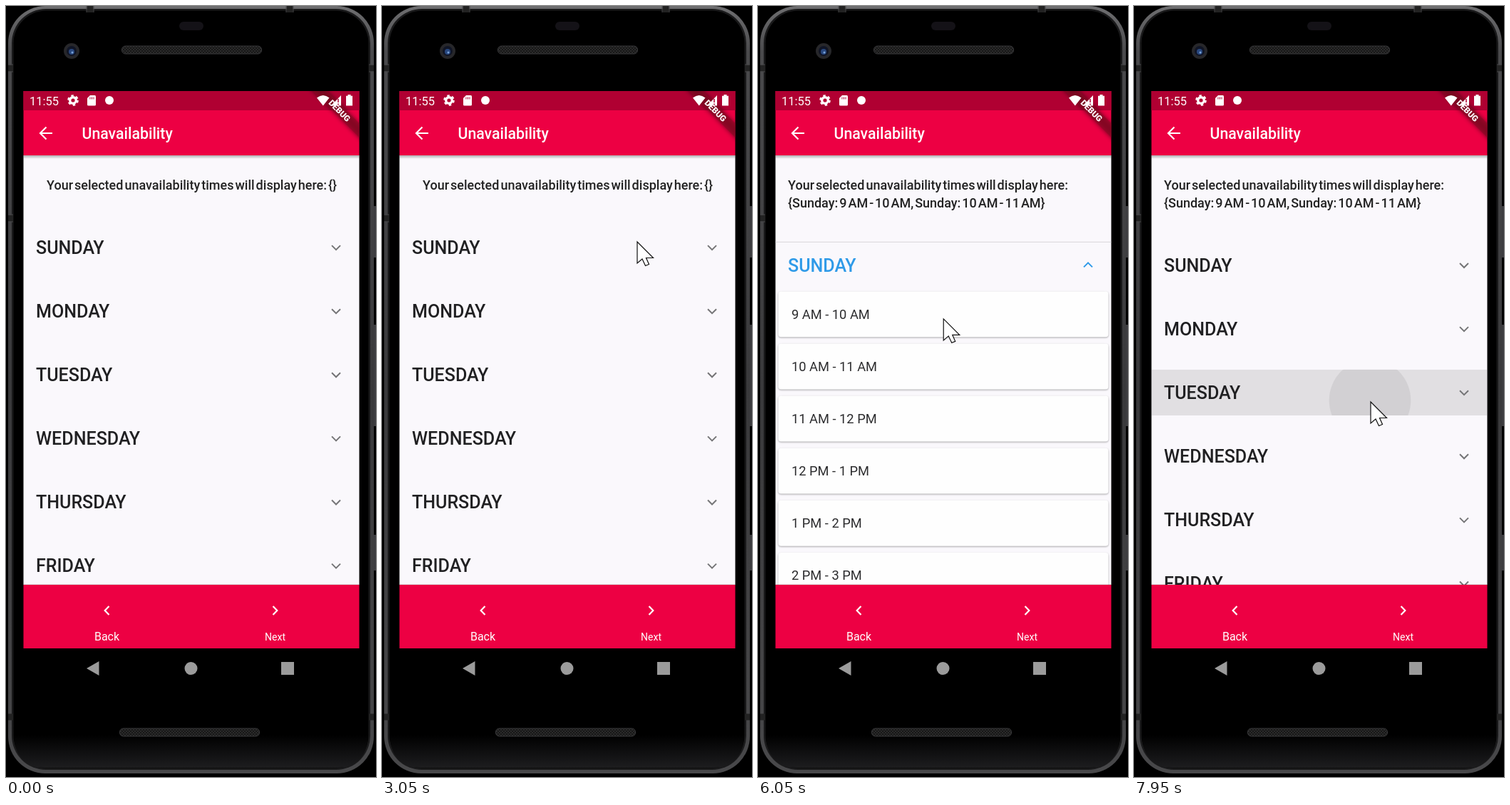
Write an HTML page that moves like this. It is 519 by 1079 pixels and loops after 8000 ms.

```html
<!DOCTYPE html>
<html lang="en">
<head>
<meta charset="utf-8">
<title>Unavailability picker</title>
<style>
  html, body { margin: 0; width: 100%; height: 100%; overflow: hidden; background: #000; }
  svg { display: block; }
  #stage { width: 519px; height: 1079px; font-family: Roboto, "Noto Sans", sans-serif; }
  text { white-space: pre; }
  .title { font-size: 21.3px; font-weight: 500; fill: #fff; }
  .note { font-size: 18px; font-weight: 500; word-spacing: -2.5px; fill: #222; }
  .day { font-size: 25.1px; font-weight: 500; }
  .slot { font-size: 18.3px; fill: #2b2b2d; }
  .card { fill: #fefefe; filter: drop-shadow(0 1px 1px #0005); }
  .line { fill: none; stroke: #fff; stroke-width: 2.2; }
</style>
</head>
<body>
<svg id="stage" viewBox="0 0 519 1079">
  <defs>
    <linearGradient id="rim" x2="0" y2="1">
      <stop stop-color="#6e6e70"/><stop offset=".06" stop-color="#4a4a4c"/>
      <stop offset=".5" stop-color="#39393b"/><stop offset="1" stop-color="#48484a"/>
    </linearGradient>
    <linearGradient id="chin" x2="0" y2="1">
      <stop stop-color="#000"/><stop offset="1" stop-color="#1d1d1f"/>
    </linearGradient>
    <linearGradient id="shade" x2="0" y2="1">
      <stop stop-color="#000" stop-opacity=".3"/><stop offset="1" stop-color="#000" stop-opacity="0"/>
    </linearGradient>
    <pattern id="mesh" width="4" height="4" patternUnits="userSpaceOnUse">
      <rect width="4" height="4" fill="#2b2b2b"/>
      <path d="M0 0h2v2h-2zM2 2h2v2h-2z" fill="#171717"/>
    </pattern>
  </defs>

  <!-- phone body -->
  <path d="M515 280h4v72h-4zM515 446h4v142h-4zM515 740h4v50h-4z" fill="#3d3d40"/>
  <rect x="3" width="513" height="1074" rx="52" fill="url(#rim)"/>
  <rect x="8" y="4" width="503" height="1065" rx="48" fill="#1a1a1b"/>
  <rect x="10.500" y="6.500" width="498" height="1060" rx="46"/>
  <path d="M11 1020H508Q506 1066 464 1066H55Q13 1066 11 1020Z" fill="url(#chin)"/>
  <path d="M118 0v9M398 0v9M3 87h7M3 297h7M509 87h7M509 995h7M3 995h7" stroke="#222" stroke-width="9"/>
  <path d="M113 0v9M123 0v9M393 0v9M403 0v9M3 82h7M3 92h7M3 292h7M3 302h7M509 82h7M509 92h7" stroke="#48484a"/>
  <rect x="243" y="22" width="34" height="12" rx="6" fill="#141217"/>
  <circle cx="92" cy="63" r="11" fill="#27272a"/>
  <circle cx="92" cy="63" r="7" fill="#101526"/>
  <circle cx="92" cy="64" r="4" fill="#28477e"/>
  <circle cx="93" cy="65" r="1.500" fill="#7ba4dc"/>
  <g fill="url(#mesh)" stroke="#39393b">
    <rect x="162.500" y="56" width="196" height="11" rx="5"/>
    <rect x="159.500" y="1011" width="196" height="11" rx="5"/>
  </g>
  <g fill="#9b9b9b">
    <path d="M113 927L130.500 917V937Z"/>
    <circle cx="259.500" cy="927" r="9"/>
    <rect x="386" y="918" width="18" height="18"/>
  </g>

  <!-- scrolling content -->
  <rect x="24.500" y="209" width="471" height="601" fill="#faf8fc"/>
  <svg id="list" x="24.500" y="209" width="471" height="601" viewBox="24.500 209 471 601"></svg>

  <!-- bars -->
  <rect x="24.500" y="209" width="471" height="5" fill="url(#shade)"/>
  <rect x="24.500" y="119" width="471" height="90" fill="#ed0043"/>
  <rect x="24.500" y="119" width="471" height="27" fill="#b00032"/>
  <rect x="24.500" y="810" width="471" height="89" fill="#ed0043"/>
  <path d="M24.500 809.500h471" stroke="#0002"/>
  <svg x="24.500" y="119" width="471" height="100" viewBox="-471 0 471 100">
    <g transform="rotate(45)">
      <rect x="-60" y="32" width="120" height="14" fill="#000" fill-opacity=".5" style="filter:blur(3px)"/>
      <rect x="-60" y="32" width="120" height="14" fill="#8c0a24" fill-opacity=".63"/>
      <text y="43.200" font-size="11.700" font-weight="900" fill="#fff" text-anchor="middle">DEBUG</text>
    </g>
  </svg>
  <g fill="#fff">
    <text x="33" y="138.700" font-size="16.500">11:55</text>
    <circle cx="94" cy="132" r="4.300" fill="none" stroke="#fff" stroke-width="3.400"/>
    <circle cx="94" cy="132" r="6.500" fill="none" stroke="#fff" stroke-width="2.600" stroke-dasharray="3.400"/>
    <path d="M118 125h6.500q1.500 0 1.500 1.500v11.500q0 1.500-1.500 1.500h-9q-1.500 0-1.500-1.500v-9Z"/>
    <path d="M118 127.500v3M120.500 127.500v3M123 127.500v3" stroke="#b00032"/>
    <circle cx="145" cy="132" r="6"/>
    <path d="M436 128.500Q444.800 121.500 453.500 128.500L444.800 139.500Z"/>
    <path d="M456 139.500L470 125V139.500Z"/>
    <path d="M466 130v5M466 136.500v2" stroke="#b00032" stroke-width="1.500"/>
    <path d="M479.500 124h4v1.800h2.500v13.700h-9v-13.700h2.500Z"/>
    <text x="141.500" y="888" font-size="16" text-anchor="middle">Back</text>
    <text x="377.500" y="888" font-size="14" text-anchor="middle">Next</text>
  </g>
  <path class="line" d="M65 178H48.500M56.500 169.500L48 178L56.500 186.500"/>
  <path class="line" d="M144.500 840L138.700 846L144.500 852M374.500 840L380.300 846L374.500 852"/>
  <text class="title" x="106.500" y="185.500">Unavailability</text>
  <path id="cursor" d="M0 0V30L7 24L11.500 33.500L16.500 31.500L12.500 22.500H22.500Z" fill="#fff" stroke="#111" stroke-width="1.200"/>
</svg>
<script>
const LOOP = 8000, LEFT = 24.5, WIDE = 471, TILE = 64.2, PITCH = 89.1, CARD = 73.1;
const days = ['SUNDAY', 'MONDAY', 'TUESDAY', 'WEDNESDAY', 'THURSDAY', 'FRIDAY', 'SATURDAY'];
const hour = h => `${(h + 11) % 12 + 1} ${h < 12 ? 'AM' : 'PM'}`;
const slots = Array.from({ length: 13 }, (_, i) => `${hour(i + 9)} - ${hour(i + 10)}`);
const FULL = slots.length * CARD;

const OPEN = 3340, CLOSE = 6836, PICK1 = 4550, PICK2 = 5400;
const taps = [
  { row: 0, at: 3320, x: 358, dy: -7 },
  { row: 0, at: 6815, x: 247, dy: -8 },
  { row: 2, at: 7790, x: 331, dy: 11, held: true }
];
// time, x, y of the pointer tip
const path = [
  [2300, 525, 420], [3000, 358, 330], [3400, 358, 330], [4100, 237, 416], [4600, 237, 416],
  [5080, 271, 518], [5500, 271, 518], [6650, 248, 347], [7000, 248, 347], [7700, 332, 554], [LOOP, 332, 554]
];

const list = document.getElementById('list'), cursor = document.getElementById('cursor');
const clamp = v => Math.min(1, Math.max(0, v));
const mix = (a, b, k) => a + (b - a) * k;
const blend = (a, b, k) => `rgb(${a.map((v, i) => Math.round(mix(v, b[i], k)))})`;
const label = (cls, x, y, s, fill = '') => `<text class="${cls}" x="${x}" y="${y}"${fill && ` fill="${fill}"`}>${s}</text>`;
const rule = (y, a) => `<path d="M${LEFT} ${y}h${WIDE}" stroke="#dddce0" stroke-opacity="${a}" stroke-width="1.3"/>`;
const clip = (y, h, body) =>
  `<svg x="${LEFT}" y="${y}" width="${WIDE}" height="${h}" viewBox="${LEFT} ${y} ${WIDE} ${h}">${body}</svg>`;

function note(t) {
  const intro = 'Your selected unavailability times will display here:';
  if (t < PICK1) return label('note', 57, 257, intro + ' {}');
  const picked = slots.slice(0, t < PICK2 ? 1 : 2).map(s => 'Sunday: ' + s).join(', ');
  return label('note', 42, 257, intro) + label('note', 42, 281.5, `{${picked}}`);
}

function ink(t, row, top) {
  return taps.map(p => {
    const dt = t - p.at;
    if (p.row !== row || dt < 0) return '';
    const r = p.held ? dt * 0.356 : dt * 1.05;
    const alpha = 0.065 * (p.held ? 1 : clamp(1 - dt / 450));
    const press = p.held ? 0.1 * clamp(dt / 120) : 0;
    return clip(top, TILE, `<rect x="${LEFT}" y="${top}" width="${WIDE}" height="${TILE}" fill-opacity="${press}"/>` +
      `<circle cx="${p.x}" cy="${top + TILE / 2 + p.dy}" r="${r}" fill-opacity="${alpha}"/>`);
  }).join('');
}

function cards(y) {
  return slots.map((s, i) => {
    const top = y + i * CARD + 4.6;
    return `<rect class="card" x="28.5" y="${top}" width="463" height="63.9" rx="4"/>` +
      label('slot', 47, top + 38.2, s);
  }).join('');
}

function rows(t) {
  const p = clamp((t - OPEN) / 200) - clamp((t - CLOSE) / 200);
  const grown = p ** 1.7 * FULL;
  let top = (t < PICK1 ? 305.7 : 330.6), out = '';
  days.forEach((day, i) => {
    const k = i ? 0 : p, mid = top + TILE / 2;
    out += ink(t, i, top);
    out += label('day', 42, mid + 9, day, blend([32, 32, 34], [46, 154, 232], Math.sqrt(k)));
    out += `<path d="M-6 -2.7L0 3.3L6 -2.7" transform="translate(463 ${mid}) rotate(${180 * k ** 1.7})"` +
      ` fill="none" stroke-width="2" stroke="${blend([117, 117, 119], [46, 154, 232], k)}"/>`;
    top += TILE;
    if (k > 0) {
      out += clip(top, grown, cards(top + (grown - FULL) / 2));
      out += rule(top - TILE - 0.3, clamp(k * 2)) + rule(top + grown, clamp(k * 2));
      top += grown;
    }
    top += PITCH - TILE;
  });
  return out;
}

function movePointer(t) {
  const i = path.findIndex(q => q[0] > t);
  cursor.style.display = i > 0 ? '' : 'none';
  if (i < 1) return;
  const [a, b] = [path[i - 1], path[i]];
  const u = (t - a[0]) / (b[0] - a[0]), e = u * u * (3 - 2 * u);
  cursor.setAttribute('transform', `translate(${mix(a[1], b[1], e)} ${mix(a[2], b[2], e)})`);
}

function frame() {
  const t = performance.now() % LOOP;
  list.innerHTML = note(t) + rows(t);
  movePointer(t);
  requestAnimationFrame(frame);
}
frame();
</script>
</body>
</html>
```
